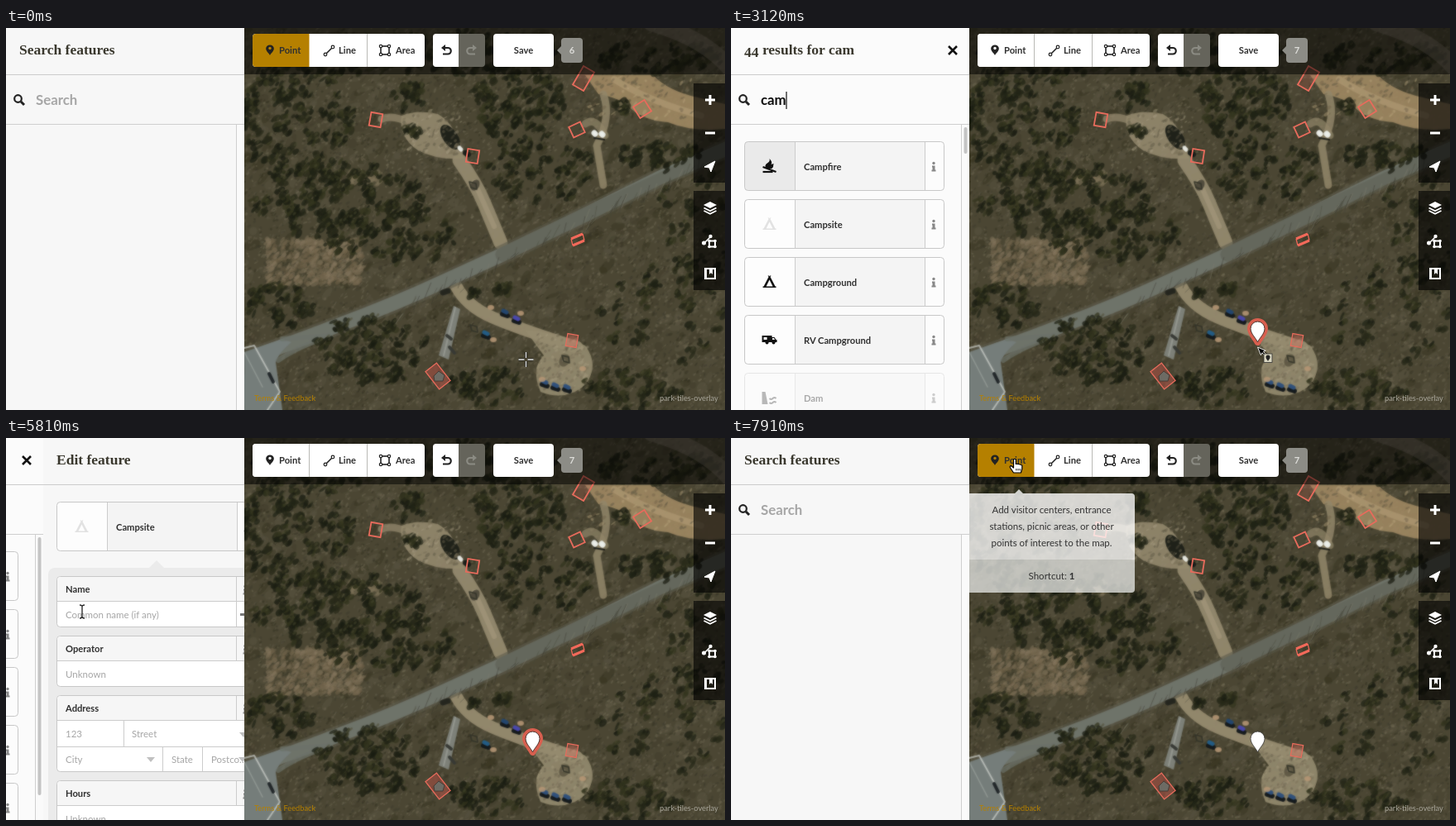
Animation of 869x462 px, one loop 8000 ms. Source, as an HTML page with a canvas:

```html
<!DOCTYPE html>
<html lang="en">
<head>
<meta charset="utf-8">
<title>Map editor: add a campsite</title>
<style>
html, body { margin: 0; width: 100%; height: 100%; overflow: hidden; background: #443f2e; }
canvas, svg { position: absolute; left: 0; top: 0; width: 869px; height: 462px; }
text { font: 11.5px Lato, sans-serif; fill: #333; white-space: pre; }
.b { font-weight: 700; font-size: 11.2px; fill: #303030; }
.h { font: 700 17.5px "Liberation Serif", serif; fill: #3a382e; }
.s { font-weight: 700; font-size: 16.8px; fill: #0a0a0a; }
.hint { fill: #a6a6a6; }
.tiny { font-size: 9.25px; fill: #aaa79c; }
.link { fill: #b58000; }
.count { fill: #dcdcd8; }
.mid { text-anchor: middle; }
</style>
</head>
<body>
<canvas id="map" width="869" height="462"></canvas>
<svg id="ui" viewBox="0 0 869 462"></svg>
<script>
const LOOP = 8000;

// ---------- aerial backdrop ----------
function drawMap() {
  const c = document.getElementById('map').getContext('2d');
  let seed = 17;
  const rnd = () => (seed = (seed * 16807) % 2147483647) / 2147483647;
  const pick = list => list[Math.floor(rnd() * list.length)];
  const blob = (x, y, rx, ry, color, alpha = 1, rot = 0) => {
    c.globalAlpha = alpha;
    c.fillStyle = color;
    c.beginPath();
    c.ellipse(x, y, rx, ry, rot, 0, 7);
    c.fill();
  };
  const trace = (d, color, width, alpha = 1) => {
    c.globalAlpha = alpha;
    c.lineCap = c.lineJoin = 'round';
    c.lineWidth = width;
    c.strokeStyle = c.fillStyle = color;
    width ? c.stroke(new Path2D(d)) : c.fill(new Path2D(d));
  };
  const flecks = (n, x, y, w, h, colors, alpha, size) => {
    for (let i = 0; i < n; i++)
      blob(x + rnd() * w, y + rnd() * h, size + rnd() * size * 2, size * .6 + rnd() * size, pick(colors), alpha, -1.2 + rnd());
  };
  // Each crown is a few dark clumps leaning up to the right.
  const grove = (cx, cy, rx, ry, n) => {
    for (let i = 0; i < n; i++) {
      const a = rnd() * 6.28, r = Math.sqrt(rnd());
      const x = cx + rx * r * Math.cos(a), y = cy + ry * r * Math.sin(a);
      for (let k = 0; k < 4; k++)
        blob(x + rnd() * 10 - 5, y + rnd() * 10 - 5, 2 + rnd() * 4, 1.5 + rnd() * 2.5, pick(['#1b1e13', '#212417', '#282a1a', '#34351f']), .75, -1.2 + rnd() * .8);
      blob(x + 3, y - 4, 2.5, 1.5, '#4a4a30', .5, -.8);
    }
  };

  c.fillStyle = '#4b4734';
  c.fillRect(288, 0, 581, 462);
  flecks(900, 288, 0, 581, 462, ['#35331f', '#575340', '#403d2b', '#605a46'], .4, 4);
  flecks(9000, 288, 0, 581, 462, ['#2c2b1c', '#39372a', '#5e5845', '#6c6550', '#7a725d'], .4, 1);
  flecks(500, 315, 255, 115, 55, ['#7b6d54', '#6c6048', '#8a7b61'], .45, 2);
  flecks(50, 415, 172, 40, 18, ['#80745a'], .5, 2);
  const sand = '#94896e';
  trace('M700 57H782Q800 76 836 84L869 92V122Q830 126 800 114Q772 112 756 98Q742 84 716 80Z', '#a08963', 0, .9);
  trace('M735 62Q775 88 840 106', '#b7a17c', 8, .5);
  trace('M722 80Q732 108 714 142L722 190', '#92866a', 9, .85);
  trace('M700 116Q712 106 724 130', '#92866a', 9, .7);
  trace('M478 106Q498 98 522 104Q546 118 554 158Q520 160 498 148Q474 132 478 106Z', sand, 0, .9);
  trace('M454 110Q468 104 490 116', sand, 9, .75);
  trace('M548 160Q568 188 578 212L598 260', sand, 17, .95);
  trace('M566 186L590 240', '#aba083', 6, .5);
  trace('M544 312Q556 336 588 350T690 386', '#968b6f', 15, .95);
  trace('M628 366Q660 366 700 384Q718 408 700 432Q676 452 646 440Q634 412 650 396Z', '#958b6f', 0, .9);

  const road = 'M280 404Q360 376 400 360Q470 334 530 306L600 274L700 226L790 181L880 142';
  trace(road, '#5c5b4b', 23, .6);
  trace(road, '#6f736a', 17);
  trace('M600 274L700 226L880 142', '#55574a', 17, .4);
  trace('M288 392L334 376L345 380Q330 392 326 404L334 462H288Z', '#757d7a', 0);
  trace('M334 376L392 372Q352 386 329 402', '#6d726a', 6, .7);
  trace('M288 387L300 384L331 440L316 462', '#c6c9c3', 2, .8);
  trace('M318 418l5 10', '#222729', 4);
  trace('M288 392L310 434', '#aeb3ae', 1.5, .5);

  [[350, 110, 70, 70, 100], [400, 205, 105, 45, 115], [465, 250, 80, 35, 55], [330, 335, 42, 25, 30],
   [440, 390, 66, 40, 70], [620, 90, 55, 48, 80], [645, 170, 60, 45, 45], [790, 36, 76, 16, 40],
   [830, 250, 45, 90, 30], [760, 435, 60, 24, 35], [790, 340, 75, 70, 30], [580, 432, 45, 22, 30],
   [480, 30, 185, 26, 110], [785, 152, 50, 20, 28], [590, 318, 30, 8, 10], [490, 82, 20, 16, 14],
   [495, 120, 10, 12, 6], [745, 96, 10, 8, 5]].forEach(g => grove(...g));
  blob(537, 132, 9, 17, '#20221a', 1, -.6);
  blob(567, 190, 5, 7, '#4a4638', .9, .5);
  blob(675, 402, 6, 8, '#504a38', .7, .5);
  flecks(150, 640, 370, 65, 70, ['#aba085', '#746a53', '#5f5845'], .4, 1.2);
  flecks(110, 480, 100, 70, 55, ['#aba085', '#746a53', '#55503d'], .45, 1.2);
  flecks(90, 700, 58, 130, 55, ['#bba77f', '#6d5f47', '#55503d'], .45, 1.3);
  for (let i = 0; i < 90; i++) {
    const x = 470 + rnd() * 390, y = 344 - (x - 470) * .48 + rnd() * 14;
    trace(`M${x} ${y}l${2 + rnd() * 8} ${-5 - rnd() * 14}`, pick(['#35342a', '#48473a', '#827f70']), .9, .5);
  }

  // building, vehicles, tents
  trace('M541 336L549 340L535 401L523 396Z', '#7d8079', 0);
  trace('M543 338L529 396', '#a0a29a', 2, .7);
  trace('M533 372l5 4M536 386l6 7', '#383a35', 4);
  trace('M528 320l6 -2', '#25261f', 7);
  [[603, 344, '#24466f'], [617, 352, '#4a48ac'], [580, 370, '#245d85'], [651, 429, '#30507c'],
   [664, 433, '#30507c'], [678, 435, '#30507c']].forEach(([x, y, color]) => {
    trace(`M${x - 3} ${y + 2}l6 2`, '#15191c', 6);
    trace(`M${x - 2} ${y - 2}l4 2`, color, 5);
  });
  [[586, 338], [589, 377], [697, 412], [648, 425], [622, 345]].forEach(([x, y]) => blob(x, y, 4, 3, '#b59674', .9));
  [[565, 363], [676, 400], [564, 190]].forEach(([x, y]) => trace(`M${x - 4} ${y - 4}l8 2l1 7l-7 -2z`, '#343429', 1.6));
  trace('M711 127l1 1M720 128l1 1', '#eceee9', 7);
  trace('M711 133l12 2', '#1b1c18', 2);
  trace('M548 145l2 2', '#e5e6df', 5);
  trace('M555 151l4 2', '#1c1e1b', 6);
  trace('M780 -6Q845 12 876 50', '#81796a', 20, .5);

  c.globalAlpha = .6;
  c.filter = 'blur(.8px)';
  c.drawImage(c.canvas, 0, 0);
}

// ---------- SVG helpers ----------
const rect = (x, y, w, h, fill, rest = '') => `<rect x="${x}" y="${y}" width="${w}" height="${h}" fill="${fill}" ${rest}/>`;
const text = (x, y, str, cls = '') => `<text x="${x}" y="${y}" class="${cls}">${str}</text>`;
const path = (d, fill = 'none', stroke = 'none', w = 1, rest = '') => `<path d="${d}" fill="${fill}" stroke="${stroke}" stroke-width="${w}" ${rest}/>`;
const holed = (d, fill) => path(d, fill, 'none', 0, 'fill-rule="evenodd"');
const dot = (x, y, r, fill, rest = '') => `<circle cx="${x}" cy="${y}" r="${r}" fill="${fill}" ${rest}/>`;
const at = (x, y, body, rest = '') => `<g transform="translate(${x} ${y})" ${rest}>${body}</g>`;
const line = (d, color = '#ccc', w = 1) => path(d, 'none', color, w);
const turned = (x, y, w, h, deg, fill = 'none', sw = 1.8) =>
  rect(x - w / 2, y - h / 2, w, h, fill, `stroke="#e76b5c" stroke-width="${sw}" transform="rotate(${deg} ${x} ${y})"`);

const PIN = 'M0 0C-2 -5 -8.5 -10 -8.5 -16.5A8.5 8.5 0 0 1 8.5 -16.5C8.5 -10 2 -5 0 0Z';
const TENT = 'M-8 7V5.5H-7L-1 -6L-2 -7.5H-.5L0 -6.5L.5 -7.5H2L1 -6L7 5.5H8V7ZM-4 5.5H4L0 -2.5Z';
const ICON = {
  tent: color => holed(TENT, color),
  camp: () => holed(TENT, '#111'),
  picnic: () => line('M-6 -5H6M-8 0H8M-3 -5L-6 6M3 -5L6 6', '#111', 2),
  parking: () => holed('M-6 8V-8H1.5A5 5 0 0 1 1.5 3H-2.5V8ZM-2.5 -5V0H1A2.5 2.5 0 0 0 1 -5Z', '#111'),
  info: () => dot(0, 0, 8, 'none', 'stroke="#222" stroke-width="1.3"') + line('M-2.5 -2A2.5 2.5 0 1 1 1 .2Q0 .8 0 2.2', '#222', 1.7) + dot(0, 4.5, 1.1, '#222'),
  visitor: () => path('M-8 8V1L0 -4L8 1V8H2V3H-2V8Z', '#111') + line('M0 -3V-9', '#111') + path('M0 -9H6V-5H0Z', '#27a04a'),
  fire: () => path('M-4 3Q-7 -1 -2 -4Q1 -6 0 -9Q4 -5 2 -2L5 -3Q5 1 3 3Z', '#111') + line('M-8 1L8 7', '#111', 2.2) + line('M-8 7H4', '#111', 2.2),
  rv: () => holed('M-9 -5H3V-3H6L8 0H9V3H-9ZM-7 -3V0H-3V-3ZM3.5 -2V0H6.5L5.5 -2Z', '#111') + dot(-3, 3.5, 2, '#111') + dot(5, 3.5, 2, '#111'),
  dam: () => path('M-9 8V-7H-5L-2 8Z', '#555') + line('M0 1q2 2 4 0t4 0M0 6q2 2 4 0t4 0', '#555', 2),
  pin: () => at(0, 8, path(PIN, 'none', '#333', 2, 'transform="scale(.68)"')),
  none: () => ''
};
const infoMark = (x, y) => dot(x, y - 4.5, 1.7, '#888') + path(`M${x - 2} ${y - 1.5}h3.5v5h1v2h-5v-2h1v-3h-.5Z`, '#888');

// ---------- side panel ----------
const cross = line('M263 22L273 32M273 22L263 32', '#111', 2.6);
const thumb = (y, end) => rect(281.5, y, 4, end - y, '#c4c4c4', 'rx="2"');
const frame = (title, fill = '#f7f7f7') => rect(0, 0, 288, 462, fill) + title + line('M0 56.5H288');

function searchBar(value, caret) {
  const lens = dot(14.5, 85.5, 4.3, 'none', 'stroke="#222" stroke-width="2.2"') + line('M18 89L22 93', '#222', 3);
  const caretX = [37, 45, 54, 67, 77, 84, 88, 95, 104][value.length];
  return lens + text(36, 93, value || 'Search', value ? 's' : 's hint') +
    (caret ? line(`M${caretX} 77V98`, '#111', 1.2) : '') +
    line('M0 116.5H288M278.5 117V462', '#cfcfcf') + rect(279, 117, 9, 345, '#fafafa');
}

function presetRow(y, [label, icon, tone], { first, hover, body = '#f4f4f4' } = {}) {
  const blue = tone === 'blue' && '#e8eaff';
  return at(0, y, rect(16.5, .5, 241, 59, blue || (hover ? '#ebebeb' : body), 'rx="4"') +
    path('M20.5 .5H77.5V59.5H20.5Q16.5 59.5 16.5 55.5V4.5Q16.5 .5 20.5 .5Z', blue || (first ? '#eaeaea' : '#fdfdfd')) +
    path('M234.5 .5H253.5Q257.5 .5 257.5 4.5V55.5Q257.5 59.5 253.5 59.5H234.5Z', '#fcfcfc') +
    at(46.5, 30, ICON[icon](tone === 'white' ? '#fff' : '#e2e2e2')) + text(88, 35, label, 'b') + infoMark(245, 31) +
    rect(16.5, .5, 241, 59, 'none', 'rx="4" stroke="#c8c8c8"') + line('M77.5 1V59M234.5 1V59'), tone === 'faded' ? 'opacity=".4"' : '');
}

const START = [['Campground', 'camp'], ['Picnic Area', 'picnic'], ['Parking', 'parking'], ['Information', 'info'], ['Visitor Center', 'visitor']];
const BROAD = [['Campfire', 'fire'], ['Campsite', 'tent'], ['Campground', 'camp'], ['RV Campground', 'rv'], ['Dam', 'dam', 'faded']];
const EXACT = [['Campsite', 'tent', 'white'], ['RV Campground', 'rv'], ['Campfire', 'fire'], ['Archaeological Site', 'none'], ['Point', 'pin', 'blue']];
const COUNTS = ['', 50, 50, 44, 12, 5, 5, 5, 5];

function listPane(value, caret, hover) {
  const n = value.length;
  const rows = n === 0 ? START : n < 5 ? BROAD : EXACT;
  const title = n ? `<tspan dy="3">${COUNTS[n]}</tspan><tspan dy="-3"> results for ${value}</tspan>` : 'Select feature type';
  return frame(text(16, 32, title, 'h') + cross, '#fbfbfb') + searchBar(value, caret) +
    rows.map((r, i) => presetRow(137 + 70 * i, r, n ? { first: !i, hover: hover && !i } : { body: '#fbfbfb' })).join('') +
    thumb(120, n === 0 ? 252 : n < 5 ? 152 : 432);
}

const idlePane = () => frame(text(16, 32, 'Search features', 'h')) + searchBar('', false);

function field(y, label, height, body) {
  return rect(16.5, y + .5, 240, height, '#fff', 'rx="4" stroke="#c8c8c8"') +
    path(`M17 ${y + 30}V${y + 5}Q17 ${y + 1} 21 ${y + 1}H252Q256 ${y + 1} 256 ${y + 5}V${y + 30}Z`, '#f6f6f6') +
    line(`M17 ${y + 30.5}H256M233.5 ${y + 1}V${y + 30}`) +
    text(27, y + 20, label, 'b') + infoMark(244, y + 17) + body;
}
const hint = (x, y, str) => text(x, y, str, 'hint');
const drop = (x, y) => path(`M${x - 5} ${y - 2}H${x + 5}L${x} ${y + 4}Z`, '#c0c0c0');

function editPane() {
  return frame(text(16, 32, 'Edit feature', 'h') + cross) + rect(279, 57, 9, 405, '#fafafa') + line('M278.5 57V462', '#ddd') +
    presetRow(77, ['Campsite', 'tent']) +
    rect(6, 157, 262, 330, '#ebebeb', 'rx="8"') + path('M128 157L137 148L146 157Z', '#ebebeb') +
    field(167, 'Name', 61, hint(27, 218, 'Common name (if any)') + line('M233.5 198V228') + line('M238 213.5H251M244.5 207V220', '#777', 3)) +
    field(239, 'Operator', 61, hint(27, 290, 'Unknown')) +
    field(311, 'Address', 92, hint(27, 362, '123') + hint(107, 362, 'Street') + drop(242, 358) +
      hint(27, 393, 'City') + drop(130, 388) + hint(155, 393, 'State') + hint(203, 393, 'Postco…') + drop(241, 388) +
      line('M97.5 342V373M17 373.5H256M144.5 374V403M192.5 374V403')) +
    field(414, 'Hours', 61, hint(27, 465, 'Unknown')) + thumb(60, 238);
}

// ---------- map chrome ----------
const buildings = [[447, 111, 14, 16, 10], [564, 155, 14, 16, 9], [698, 61, 15, 26, 30, '#e76b5c30'], [769, 98, 16, 16, -32],
  [690, 123, 15, 14, -25], [684, 378, 13, 15, 10, '#e76b5c55', 1.2], [522, 421, 17, 27, -38, '#c9554a70', 1.3]].map(b => turned(...b)).join('') +
  line('M683 255L697 249M685 263L699 257', '#f2695a', 3) + line('M683 255L685 263M697 249L699 257', '#f2695a', 1.2) +
  path('M517 421L523 415L530 420L528 427H518Z', '#6d6b64', '#463d37', 1);

const undo = color => line('M-3 -3H2A3.5 3.5 0 0 1 2 4.5H-4', color, 2.2) + path('M-6 -3L-1 -7V1Z', color);
const redo = `<g transform="translate(563 27) scale(-1 1)">${undo('#8b8b83')}</g>`;

const square = (x, y, s) => [[x, y], [x + s, y], [x, y + s], [x + s, y + s]];
const controls = rect(831, 67, 38, 120, '#000', 'opacity=".62"') + rect(831, 197, 38, 120, '#000', 'opacity=".62"') +
  line('M845 87H857M851 81V93M845 127H857', '#fff', 3) + path('M844 168L857 161L852 174L850 169Z', '#fff', '#fff') +
  path('M851 210L859 214L851 218L843 214Z', '#fff') + line('M843.5 217.5L851 221.3L858.5 217.5M843.5 221L851 224.8L858.5 221', '#fff', 1.8) +
  line('M844 260L852 252', '#fff', 1.5) + dot(843.5, 260, 2.5, '#fff') + dot(851.5, 252, 2.2, '#fff') +
  rect(850, 257.5, 7, 7, 'none', 'stroke="#fff" stroke-width="2"') + square(850, 257.5, 7).map(p => dot(...p, 1.8, '#fff')).join('') +
  holed('M844 290H858V304H844ZM847 292V302H856V292H854V298L852 296L850 298V292Z', '#fff');

const credits = text(300, 451, 'Terms &amp; Feedback', 'tiny link') + text(790, 451, 'park-tiles-overlay', 'tiny');

function toolbar(active, hover, count) {
  const ink = '#222', ring = 'stroke="#222" stroke-width="1.2"';
  return rect(288, 0, 581, 56, '#000', 'opacity=".5"') + rect(298, 7, 208, 40, '#fff', 'rx="4"') +
    path('M302 7H366.5V47H302Q298 47 298 43V11Q298 7 302 7Z', active ? '#b58000' : hover ? '#ececec' : '#fff') +
    line(active ? 'M436.5 7V47' : 'M366.5 7V47M436.5 7V47', '#b9b9b5') +
    at(319, 33, path(PIN, ink, 'none', 0, 'transform="scale(.57 .5)"') + dot(0, -8.5, 1.7, active ? '#b58000' : '#fff')) + text(330, 31, 'Point', 'b') +
    line('M387 31L394 24', ink, 1.6) + dot(386, 32, 1.8, '#fff', ring) + dot(395, 23, 1.8, '#fff', ring) + text(402, 31, 'Line', 'b') +
    rect(453, 22, 10, 10, 'none', 'stroke="#222" stroke-width="1.6"') + square(453, 22, 10).map(p => dot(...p, 1.7, '#fff', ring)).join('') + text(471, 31, 'Area', 'b') +
    rect(516, 7, 63, 40, '#65645b', 'rx="4"') + path('M520 7H547V47H520Q516 47 516 43V11Q516 7 520 7Z', '#fff') + at(532, 27, undo(ink)) + redo +
    rect(589, 7, 73, 40, '#fff', 'rx="4"') + text(625.5, 31, 'Save', 'b mid') +
    path('M675 12H693Q697 12 697 16V38Q697 42 693 42H675Q671 42 671 38V32L666 27L671 22V16Q671 12 675 12Z', '#8c8c86') +
    text(684, 31, count, 'b mid count');
}

const marker = selected => at(636.5, 380,
  selected ? path(PIN, '#d85f4f', '#d85f4f', 8, 'stroke-linejoin="round"') + path(PIN, '#fff', '#47352f', 1) : path(PIN, '#fff', '#333', .8));

const tooltip = opacity => opacity ? `<g opacity="${opacity}">` +
  path('M343 67L348 62L353 67ZM288 67H484Q488 67 488 71V147H288Z', '#fff', 'none', 0, 'opacity=".78"') +
  path('M288 147H488V183Q488 187 484 187H288Z', '#e6e7e4', 'none', 0, 'opacity=".77"') +
  ['Add visitor centers, entrance', 'stations, picnic areas, or other', 'points of interest to the map.'].map((s, i) => text(387.5, 91 + 20 * i, s, 'mid')).join('') +
  text(387.5, 171, 'Shortcut: <tspan font-weight="700">1</tspan>', 'mid') + '</g>' : '';

// ---------- cursors, hot spot at the given point ----------
const ARROW = path('M0 0V14.5L3.4 11.5L5.8 17L8.3 16L5.9 10.6H10.3Z', '#000', '#fff', 1.1);
const CURSOR = {
  aim: line('M-9 0H-2M2 0H9M0 -9V-2M0 2V9', '#222', 3) + line('M-9 0H-2M2 0H9M0 -9V-2M0 2V9', '#e8e8e2', 1.3),
  arrow: ARROW,
  tagged: `<g transform="rotate(-22) scale(.72)">${ARROW}</g>` + rect(7.5, 8, 10, 10.5, '#d9d6c1', 'stroke="#333" stroke-width=".8"') +
    at(12.5, 17, path(PIN, '#222', 'none', 0, 'transform="scale(.3)"')),
  hand: path('M-1.5 0Q0 -1.5 1.3 0V5.5L3.8 5.3L6.3 6L8.8 7V11L7.4 16H-1.5L-5.5 10Q-6.5 7.5 -4.3 7.7L-1.5 10Z', '#fff', '#000', 1.2, 'stroke-linejoin="round"') +
    line('M1.8 11V13.5M4 11V13.5M6.2 11V13.5', '#000', .9),
  beam: line('M-3 -8Q0 -8 0 -6V6Q0 8 -3 8M3 -8Q0 -8 0 -6M0 6Q0 8 3 8', '#222', 1.3)
};

// ---------- timeline ----------
// Count of steps taken at t when n steps run from a to b; display ticks jitter by up to 10 ms.
const taken = (t, a, b, n) => t < a ? 0 : Math.min(n, 1 + Math.floor((t - a + 10) * (n - 1) / (b - a)));
const smooth = u => u * u * (3 - 2 * u);
const clamp = u => Math.max(0, Math.min(1, u));
const mix = (a, b, u) => a + (b - a) * u;

function pointer(t, reach, leave) {
  if (t < 2240) {
    const u = smooth(taken(t, 150, 1040, 7) / 7);
    return ['aim', mix(628.5, 637, u), mix(401, 380, u)];
  }
  if (leave) {
    const [x, y] = [[278.5, 111], [326, 56], [343, 26]][Math.min(leave, 3) - 1];
    return [leave < 3 ? 'arrow' : 'hand', x, y];
  }
  if (t >= 5810) return ['beam', 92, 210];
  const u = smooth(clamp((reach - 1) / 5));
  const kind = reach < 2 ? 'tagged' : u < .8 ? 'arrow' : 'hand';
  return [kind, mix(reach ? 635.5 : 636.5, 110, u), mix(386, 159, u)];
}

function scene(t) {
  const placed = t >= 2090, drawing = t < 2090 || t >= 7760;
  const typed = 'campsite'.slice(0, taken(t, 2830, 3860, 8));
  const reach = taken(t, 4310, 5210, 7), leave = taken(t, 6560, 7310, 6);
  const shift = Math.round(288 * smooth(taken(t, 5510, 5960, 4) / 4));
  const [kind, x, y] = pointer(t, reach, leave);

  let panel = idlePane();
  if (!drawing) {
    panel = (shift < 288 ? at(-shift, 0, listPane(typed, t >= 2380 && t < 4310, reach >= 5)) : '') +
      (shift ? at(288 - shift, 0, editPane()) : '');
  }
  return '<clipPath id="side"><rect width="288" height="462"/></clipPath>' +
    buildings + (placed ? marker(t < 7910) : '') + credits +
    toolbar(drawing, leave >= 3, placed ? 7 : 6) + controls +
    `<g clip-path="url(#side)">${panel}</g>` +
    tooltip([0, 0, 0, 0, .35, .75, 1][leave]) + at(x, y, CURSOR[kind]);
}

const ui = document.getElementById('ui');
let shown = '';
function render(t) {
  const next = scene(t);
  if (next !== shown) ui.innerHTML = shown = next;
}

drawMap();
render(0);
const began = performance.now();
requestAnimationFrame(function tick() {
  render((performance.now() - began) % LOOP);
  requestAnimationFrame(tick);
});
</script>
</body>
</html>
```
